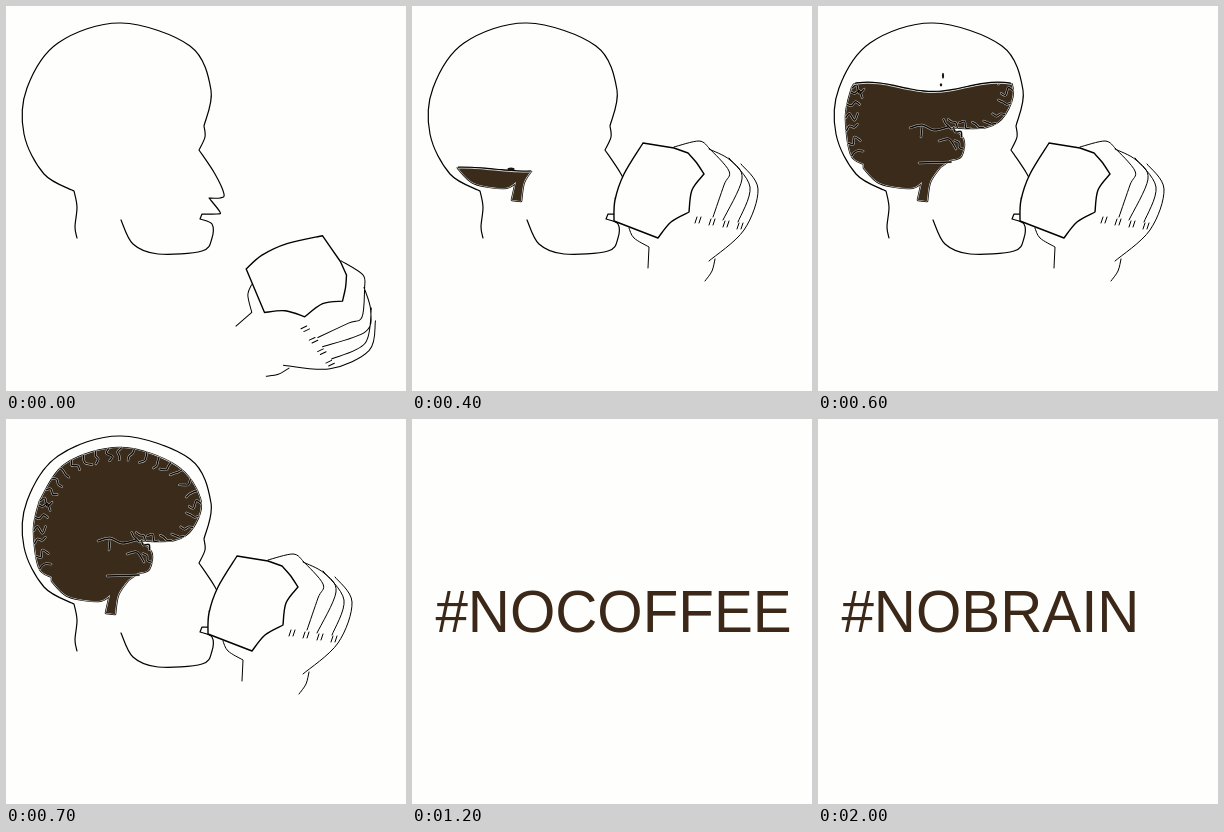
An HTML page for the animation above (2600 ms loop, 400 by 385 pixels).

```html
<!DOCTYPE html>
<html lang="en">
<head>
<meta charset="utf-8">
<title>No coffee, no brain</title>
<style>
  html, body { margin: 0; width: 100%; height: 100%; overflow: hidden; background: #fefefc; }
  svg { display: block; width: 100vw; height: 100vh; }
  path { fill: none; stroke: #000; stroke-width: 1.2; stroke-linejoin: round; stroke-linecap: round; }
  text { font: 58.3px "Liberation Sans", Arial, sans-serif; fill: #3b2819; }
  #cup { fill: #fefefc; stroke-width: 1.4; }
  #hand { stroke-width: 1; }
  #rimDark { stroke-width: 2.6; }
  #rimLight { stroke: #d5d5d0; stroke-width: 1.2; }
  #matter { fill: #3b2b1a; stroke: none; }
  #foldsLight { stroke: #c9c8c2; stroke-width: 2.4; }
  #foldsDark { stroke: #0c0805; stroke-width: 1.4; }
  #surfaceLight { stroke: #d5d5d0; }
  ellipse { fill: #1d140c; }
</style>
</head>
<body>
<svg viewBox="0 0 400 385">
  <defs>
    <clipPath id="filled"><path id="fillArea"/></clipPath>
    <clipPath id="inside"><path id="insideArea"/></clipPath>
  </defs>
  <g id="scene">
    <path id="head"/>
    <g id="brain">
      <g clip-path="url(#filled)">
        <path id="rimDark"/>
        <path id="rimLight"/>
        <path id="matter"/>
        <path id="foldsLight"/>
        <path id="foldsDark"/>
      </g>
      <g clip-path="url(#inside)">
        <path id="surfaceLight" transform="translate(0 1)"/>
        <path id="surfaceDark"/>
      </g>
      <ellipse id="blob"/>
      <ellipse id="drop"/>
    </g>
    <g id="drink"><path id="hand"/><path id="cup"/></g>
  </g>
  <text id="caption" x="23.4" y="213"></text>
</svg>
<script>
const LOOP = 2600, STEP = 100;
const $ = id => document.getElementById(id);
const setAttrs = (id, attrs) => {
  for (const name in attrs) $(id).setAttribute(name, attrs[name]);
};
const setPath = (d, ...ids) => ids.forEach(id => setAttrs(id, { d }));
const show = (id, on) => setAttrs(id, { display: on ? 'inline' : 'none' });

// Smooth curve through a run of "x,y" points.
function spline(run) {
  const p = run.trim().split(/\s+/).map(s => s.split(',').map(Number));
  const at = i => p[Math.max(0, Math.min(p.length - 1, i))];
  let d = p[0].join();
  for (let i = 0; i < p.length - 1; i++) {
    const [a, b, c, e] = [at(i - 1), at(i), at(i + 1), at(i + 2)];
    const near = b.map((v, k) => v + (c[k] - a[k]) / 6);
    const far = c.map((v, k) => v - (e[k] - b[k]) / 6);
    d += `C${near} ${far} ${c}`;
  }
  return d;
}

// ';' starts a new stroke, '/' makes a corner inside one.
const trace = spec => spec.split(';').map(s => 'M' + s.split('/').map(spline).join('L')).join('');

const HEAD = `71,232 69,221 71,201 68,185 / 68,185 38,168 18,128 21,82 52,37 115,17 184,40 205,84 198,120
  / 198,120 199,131 193,144 / 193,144 209,168 218,188 214,192 203,192 / 203,192 214,206 211,208 196,208
  / 194,213 206,218 206,232 196,245 152,248 127,238 115,214`;

const BRAIN = `34,82 60,45 115,29 170,47 194,80 187,108 168,121 130,121 / 130,121 145,133 143,150 132,154
  / 122,161 112,176 109,195 / 100,194 / 104,176 92,182 62,177 46,162 / 46,158 33,148 28,110 34,82`;

const GAPS = '92,122 104,119 116,124 130,121; 104,121 103,131; 101,157 133,156; 121,135 131,133 138,143';

const CUP = `231,137 212,168 203,194 202,215 / 246,232 / 246,232 259,216 277,206
  / 277,206 280,184 292,168 / 292,168 284,156 276,147 / 262,142 231,137`;

const HAND = `262,141 287,135 297,142 / 297,142 317,165 312,179 301,211; 297,143 318,154 330,173 311,214;
  317,152 338,181 326,216; 329,158 346,183 332,224 297,255; 303,253 300,265 293,275;
  217,222 222,232 237,241 / 236,262`;

// Two short strokes on each of the four knuckles.
function knuckles() {
  let d = '';
  for (let i = 0; i < 4; i++)
    for (const side of [-2, 2]) d += `M${285 + 14 * i + side},${217 + 2 * i}l2,-6`;
  return d;
}

// Short wiggles running from the rim towards the middle of the brain.
function folds() {
  let seed = 7;
  const random = () => (seed = seed * 16807 % 2147483647) / 2147483647;
  const rim = $('matter');
  let d = trace(GAPS);
  for (let s = 0; s < rim.getTotalLength(); s += 13) {
    const { x, y } = rim.getPointAtLength(s);
    if (y > 152) continue;
    const angle = Math.atan2(100 - y, 110 - x);
    const run = [0, 4, 8, 12].map(r => {
      const sway = r && 8 * random() - 4;
      return [x + r * Math.cos(angle) - sway * Math.sin(angle), y + r * Math.sin(angle) + sway * Math.cos(angle)];
    });
    d += trace(run.join(' '));
  }
  return d;
}

// The coffee rises faster and faster, its surface waving.
function drawBrain(rise) {
  show('brain', rise >= 0);
  if (rise < 0) return;
  const level = 163 - 27.7 * rise - 6.7 * rise * rise;
  const wave = [];
  for (let x = 15; x <= 210; x += 15)
    wave.push([x, level - (2 + 1.3 * rise) * Math.cos((x - 50) * Math.PI / 65)]);
  const line = trace(wave.join(' '));
  setPath(line, 'surfaceDark', 'surfaceLight');
  setPath(line + 'V385H15Z', 'fillArea');
  const cx = 99 + 12 * rise, splash = Math.max(0, 3 - rise);
  setAttrs('blob', { cx, cy: level - rise, rx: 1.2 * splash, ry: 1.6 });
  setAttrs('drop', { cx: cx + 2, cy: level - 5.5 * rise, rx: splash && 1.1, ry: 1.5 * rise });
}

function captionAt(t) {
  if (t < 800) return '';
  if (t >= 2000) return '#NOBRAIN';
  return t >= 1200 && t < 1600 ? '#NOCOFFEE' : '#NO';
}

function render(t) {
  const step = Math.floor(t / STEP);
  show('scene', t < 800);
  $('caption').textContent = captionAt(t);
  // The arm swings about the elbow until the cup meets the lips.
  const swing = 46 * Math.max(0, 1 - step / 3);
  setAttrs('drink', { transform: `rotate(${swing} 164.5 284)` });
  drawBrain(Math.min(3, step - 4));
}

setPath(trace(HEAD), 'head');
setPath(trace(BRAIN), 'rimDark', 'rimLight', 'matter', 'insideArea');
setPath(folds(), 'foldsLight', 'foldsDark');
setPath(trace(CUP), 'cup');
setPath(trace(HAND) + knuckles(), 'hand');

const start = performance.now();
function tick() {
  render((performance.now() - start) % LOOP);
  requestAnimationFrame(tick);
}
tick();
</script>
</body>
</html>
```
